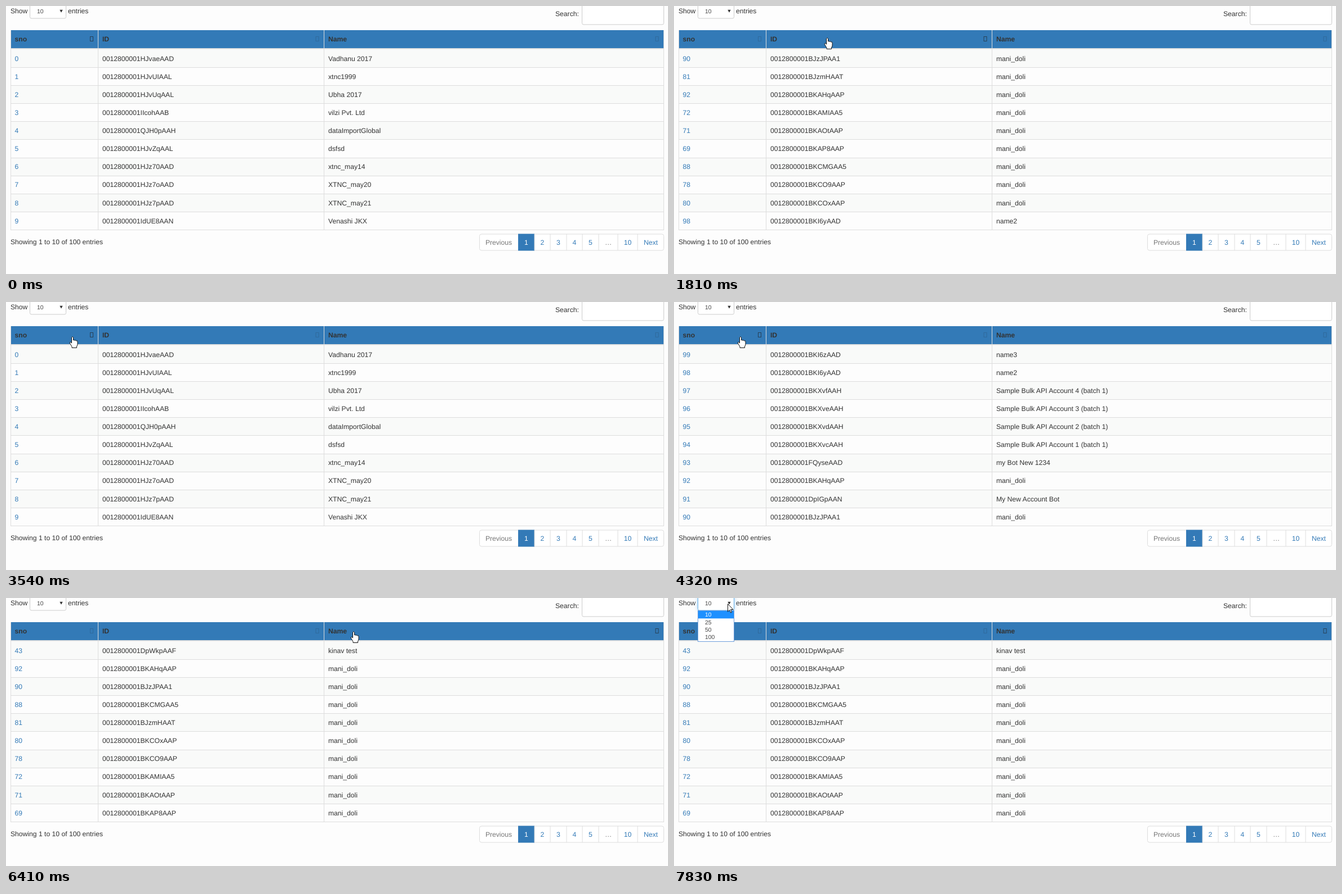
These frames come from a looping animation (1175x477 px, 8000 ms). An HTML page:

```html
<!DOCTYPE html>
<html lang="en">
<head>
<meta charset="utf-8">
<title>Sortable table</title>
<style>
html, body { margin: 0; width: 100%; height: 100%; overflow: hidden; background: #fdfdfd; }
svg { display: block; width: 1175px; height: 477px; }
text { font: 12.15px "Liberation Sans", Arial, sans-serif; fill: #333; white-space: pre; text-rendering: geometricPrecision; }
.bold { font-weight: bold; }
.link { fill: #337ab7; }
.muted { fill: #777; }
.white { fill: #fff; }
.small { font-size: 10.4px; fill: #444; }
.mid { text-anchor: middle; }
.line { fill: #ddd; }
.box { fill: #fff; stroke: #ccc; }
.icon { fill: none; stroke: #222; }

.timed { animation: 8s step-end infinite; opacity: 0; }
.view.sno { animation-name: snoUp; }
.view.idUp { animation-name: idUp; }
.view.idDown { animation-name: idDown; }
.view.snoDown { animation-name: snoDown; }
.view.nameUp { animation-name: nameUp; }
.view.nameDown { animation-name: nameDown; }
@keyframes snoUp { 0%, 44.25% { opacity: 1 } 22.625%, 54% { opacity: 0 } }
@keyframes idUp { 0%, 30.625% { opacity: 0 } 22.625% { opacity: 1 } }
@keyframes idDown { 0%, 44.25% { opacity: 0 } 30.625% { opacity: 1 } }
@keyframes snoDown { 0%, 71.5% { opacity: 0 } 54% { opacity: 1 } }
@keyframes nameUp { 0%, 80.125% { opacity: 0 } 71.5% { opacity: 1 } }
@keyframes nameDown { 0% { opacity: 0 } 80.125%, 100% { opacity: 1 } }

.icon.sno { animation-name: iconSno; }
.icon.id { animation-name: iconId; }
.icon.name { animation-name: iconName; }
@keyframes iconSno { 0%, 44.25% { opacity: .65 } 22.625%, 71.5% { opacity: .17 } }
@keyframes iconId { 0%, 44.25% { opacity: .17 } 22.625% { opacity: .65 } }
@keyframes iconName { 0% { opacity: .17 } 71.5%, 100% { opacity: .65 } }

#blank { animation-name: blank; }
#menu { animation-name: menu; }
@keyframes blank { 0% { opacity: 0 } 95.625%, 100% { opacity: 1 } }
@keyframes menu { 0% { opacity: 0 } 97.875%, 100% { opacity: 1 } }
#glow { fill: #fff; stroke: #66afe9; filter: drop-shadow(0 0 3px rgba(102, 175, 233, .6)); }

#cursor { animation: move 8s step-end infinite; }
#cursor path { fill: #fff; stroke: #111; stroke-linejoin: round; }
#arrow { animation-name: arrow; }
#hand { animation-name: hand; }
@keyframes arrow {
  0%, 7.75%, 62.94% { opacity: 0 }
  .875%, 61.01%, 83.2%, 100% { opacity: 1 }
}
@keyframes hand {
  0%, 61.01%, 83.2%, 100% { opacity: 0 }
  7.75%, 62.94% { opacity: 1 }
}
@keyframes move {
  0% { transform: translate(880px, 364px) }
  .875% { transform: translate(880px, 364px); animation-timing-function: steps(2) }
  2.375% { transform: translate(765px, 282px) }
  5.375% { transform: translate(765px, 282px); animation-timing-function: steps(2, jump-both) }
  7.75% { transform: translate(320px, 58px) }
  11.25% { transform: translate(302px, 64px) }
  12.25% { transform: translate(302px, 64px); animation-timing-function: steps(4, jump-both) }
  16.25% { transform: translate(272px, 56px) }
  34.625% { transform: translate(272px, 56px); animation-timing-function: steps(4, jump-both) }
  38.5% { transform: translate(118px, 61px) }
  58.125% { transform: translate(118px, 61px); animation-timing-function: steps(3, jump-both) }
  61.01% { transform: translate(480px, 38px); animation-timing-function: steps(3) }
  63.9% { transform: translate(635px, 52px) }
  64.875% { transform: translate(617px, 59px) }
  82.25% { transform: translate(617px, 59px); animation-timing-function: steps(3, jump-both) }
  85.125% { transform: translate(113px, 7px) }
  88% { transform: translate(113px, 7px); animation-timing-function: steps(3, jump-both) }
  91%, 100% { transform: translate(95px, 10px) }
}
</style>
</head>
<body>
<svg id="stage" viewBox="0 0 1175 477"></svg>
<script>
const COLS = [15.5, 171, 572];
const ROW = 32.11;
const USER = 'mani_doli';

// sno: [id tail, name]
const accounts = {
  0: ['HJvaeAAD', 'Vadhanu 2017'],
  1: ['HJvUIAAL', 'xtnc1999'],
  2: ['HJvUqAAL', 'Ubha 2017'],
  3: ['IIcohAAB', 'vilzi Pvt. Ltd'],
  4: ['QJH0pAAH', 'dataImportGlobal'],
  5: ['HJvZqAAL', 'dsfsd'],
  6: ['HJz70AAD', 'xtnc_may14'],
  7: ['HJz7oAAD', 'XTNC_may20'],
  8: ['HJz7pAAD', 'XTNC_may21'],
  9: ['IdUE8AAN', 'Venashi JKX'],
  17: ['QJX9bAAH', 'tekav oli mn'],
  18: ['QJXUyAAP', 'pelakinost'],
  20: ['IdUC2AAN', 'xtnc_hmk'],
  21: ['IIcoXAAR', 'my testing rest Acc'],
  24: ['HJz7VAAT', 'XTNC_may16'],
  25: ['HJz7WAAT', 'XTNC_may17'],
  26: ['HJz7XAAT', 'XTNC_may18'],
  31: ['DpVrkAAF', 'Account Bot'],
  35: ['DpVtaAAF', 'Account Test'],
  38: ['DpWgzAAF', 'API Test Account'],
  40: ['DpWhdAAF', 'Bot Account'],
  43: ['DpWkpAAF', 'kinav test'],
  45: ['DpWnsAAF', 'Bot New'],
  52: ['DpXaqAAF', 'Bulk Account'],
  58: ['DpXcwAAF', 'Bulk Test Account'],
  63: ['DpIFxAAN', 'data test'],
  69: ['BKAP8AAP', USER],
  71: ['BKAOtAAP', USER],
  72: ['BKAMIAA5', USER],
  78: ['BKCO9AAP', USER],
  80: ['BKCOxAAP', USER],
  81: ['BJzmHAAT', USER],
  88: ['BKCMGAA5', USER],
  90: ['BJzJPAA1', USER],
  91: ['DpIGpAAN', 'My New Account Bot'],
  92: ['BKAHqAAP', USER],
  93: ['FQyseAAD', 'my Bot New 1234'],
  98: ['BKI6yAAD', 'name2'],
  99: ['BKI6zAAD', 'name3']
};
[...'cdef'].forEach((c, i) => {
  accounts[94 + i] = [`BKXv${c}AAH`, `Sample Bulk API Account ${i + 1} (batch 1)`];
});

const views = {
  sno: '0 1 2 3 4 5 6 7 8 9',
  idUp: '90 81 92 72 71 69 88 78 80 98',
  idDown: '18 17 4 21 3 9 20 26 25 24',
  snoDown: '99 98 97 96 95 94 93 92 91 90',
  nameUp: '31 35 38 40 45 52 58 63 4 5',
  nameDown: '43 92 90 88 81 80 78 72 71 69'
};

const stage = document.getElementById('stage');

function add(parent, tag, attrs, content) {
  const el = document.createElementNS('http://www.w3.org/2000/svg', tag);
  for (const key in attrs) el.setAttribute(key, attrs[key]);
  if (content !== undefined) el.textContent = content;
  return parent.appendChild(el);
}
const rect = (parent, x, y, width, height, attrs) =>
  add(parent, 'rect', { x, y, width, height, ...attrs });
const text = (parent, x, y, content, cls = '') =>
  add(parent, 'text', { x, y, class: cls }, content);

function drawControls() {
  text(stage, 8, 13, 'Show');
  rect(stage, 42.5, -3.5, 64, 25.5, { rx: 2.5, class: 'box' });
  text(stage, 110, 13, 'entries');
  text(stage, 975, 18.4, 'Search:');
  rect(stage, 1022.5, -6.5, 145, 39.5, { rx: 2.5, class: 'box' });
}

function drawSelected(parent) {
  text(parent, 55, 12.8, '10', 'small');
  add(parent, 'path', { d: 'M95.3 6.8h5.4l-2.7 5z', fill: '#333' });
}

function drawGrid() {
  for (let i = 0; i < 10; i += 2) {
    rect(stage, 8, Math.round(77 + ROW * i), 1160, 32, { fill: '#f9faf9' });
  }
  rect(stage, 8, 43, 1160, 32, { fill: '#337ab7' });
  rect(stage, 8, 75, 1160, 1.7, { class: 'line' });
  for (let i = 0; i < 10; i++) {
    rect(stage, 8, Math.round(109 + ROW * i), 1160, 1, { class: 'line' });
  }
  for (const x of [8, 163, 564, 1167]) rect(stage, x, 43, 1, 356, { class: 'line' });
  ['sno', 'ID', 'Name'].forEach((label, i) => {
    text(stage, COLS[i], 63.4, label, 'bold');
    rect(stage, [149.5, 550, 1153][i], 54.5, 5, 8, { class: 'timed icon ' + label.toLowerCase() });
  });
}

function drawView(name) {
  const view = add(stage, 'g', { class: 'timed view ' + name });
  views[name].split(' ').forEach((sno, i) => {
    const y = 97.7 + ROW * i;
    const [id, title] = accounts[sno];
    text(view, COLS[0], y, sno, 'link');
    text(view, COLS[1], y, '0012800001' + id);
    text(view, COLS[2], y, title);
  });
}

function drawFooter() {
  text(stage, 8, 424.2, 'Showing 1 to 10 of 100 entries');
  const labels = ['Previous', '1', '2', '3', '4', '5', '…', '10', 'Next'];
  const edges = [840, 909, 938, 966, 995, 1023, 1052, 1086, 1121, 1168];
  rect(stage, 840.5, 406, 327, 29, { rx: 3.5, fill: '#fff', stroke: '#ddd' });
  labels.forEach((label, i) => {
    const x = edges[i], w = edges[i + 1] - x;
    const active = label === '1';
    if (active) rect(stage, x, 405.5, w, 30, { fill: '#337ab7' });
    else if (i > 1) rect(stage, x - .5, 406, 1, 29, { class: 'line' });
    const tone = active ? 'white' : i === 0 || label === '…' ? 'muted' : 'link';
    text(stage, x + w / 2, 424.9, label, 'mid ' + tone);
  });
}

function drawMenu() {
  rect(stage, 42, 22.5, 65, 55.5, { id: 'blank', class: 'timed', fill: '#fff' });
  const menu = add(stage, 'g', { id: 'menu', class: 'timed' });
  rect(menu, 42.5, -3.5, 64, 25.5, { id: 'glow', rx: 2.5 });
  drawSelected(menu);
  rect(menu, 42.5, 22.5, 64, 55, { fill: '#fff', stroke: '#6f9fdc' });
  rect(menu, 43, 23, 63, 13.4, { fill: '#1e90ff' });
  [10, 25, 50, 100].forEach((n, i) =>
    text(menu, 55, 33.2 + 13.4 * i, n, i ? 'small' : 'small white'));
  menu.querySelector('.white').style.fill = '#fff';
}

function drawCursor() {
  const cursor = add(stage, 'g', { id: 'cursor' });
  add(cursor, 'path', {
    id: 'arrow', class: 'timed',
    d: 'M.5 .6V14.2L3.6 11.3 5.6 16.2 7.6 15.3 5.6 10.5H10Z'
  });
  add(cursor, 'path', {
    id: 'hand', class: 'timed',
    d: 'M-1.5 2Q0-.6 1.5 2V7Q3.1 5.8 4 7.4 5.6 6.4 6.5 8 8.6 7.2 9 9.5V14Q9 16 7.5 18V20.5H-1V18.5' +
       'Q-3 15-4.6 12.4-5.2 10.3-3.4 10.3L-1.5 12Z'
  });
}

drawControls();
drawSelected(stage);
drawGrid();
Object.keys(views).forEach(drawView);
drawFooter();
drawMenu();
drawCursor();
</script>
</body>
</html>
```
